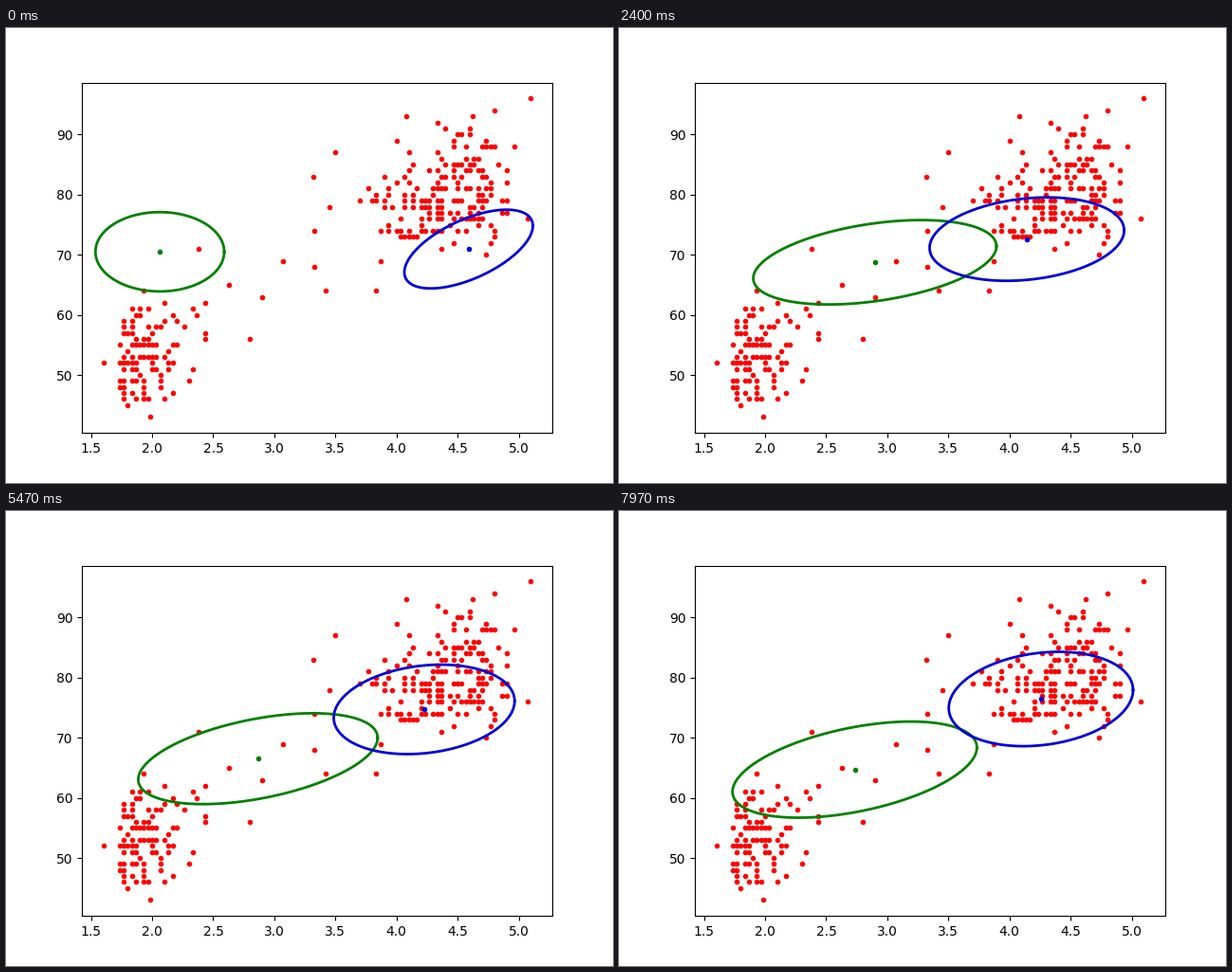
A matplotlib script for the animation above (8 s loop, 640 by 480 pixels).

```python
import random

import matplotlib.pyplot as plt
import numpy as np
from matplotlib.animation import FuncAnimation

FRAMES, LOOP_MS = 240, 8000
GREEN, BLUE = "green", "#0000d8"
ANGLE = np.linspace(0, 2 * np.pi, 181)
KEY_STEPS = np.array([0, 37, 72, 131, 239])

# Points lying apart from both clusters.
OUTLIERS = [
    (5.1, 96), (4.8, 94), (4.08, 93), (4.62, 93), (5.07, 76),
    (3.5, 87), (3.32, 83), (3.45, 78), (3.33, 74), (3.33, 68),
    (3.42, 64), (3.83, 64), (3.07, 69), (2.9, 63), (2.8, 56),
    (2.63, 65), (2.38, 71), (1.6, 52), (1.98, 43),
]


def cluster(count, draw_x, x_range, draw_y, y_range):
    """Distinct points, x in thirtieths and y whole, kept inside the ranges."""
    points = set()
    while len(points) < count:
        x = round(draw_x() * 30) / 30
        y = round(draw_y(x))
        if x_range[0] <= x <= x_range[1] and y_range[0] <= y <= y_range[1]:
            points.add((x, y))
    return sorted(points)


def smooth(values):
    """Cubic Hermite curve through values at the key steps."""
    values = np.array(values)
    slopes = np.gradient(values, KEY_STEPS, edge_order=2)

    def at(step):
        i = min(np.searchsorted(KEY_STEPS, step, side="right"),
                len(KEY_STEPS) - 1) - 1
        h = KEY_STEPS[i + 1] - KEY_STEPS[i]
        u = (step - KEY_STEPS[i]) / h
        blend = u * u * (3 - 2 * u)
        return (values[i] * (1 - blend) + values[i + 1] * blend
                + h * u * (1 - u) * ((1 - u) * slopes[i] - u * slopes[i + 1]))
    return at


class Ellipse:
    """Width, tilt and x ease between keys; y and height drift evenly."""

    def __init__(self, ax, color, x, width, tilt, y, height):
        self.x, self.width, self.tilt = smooth(x), smooth(width), smooth(tilt)
        self.y, self.height = y, height
        self.outline, = ax.plot([], [], color=color, lw=2)
        self.centre, = ax.plot([], [], ".", color=color)

    def move(self, step):
        part = step / (FRAMES - 1)
        x = self.x(step)
        y = np.interp(part, (0, 1), self.y)
        height = np.interp(part, (0, 1), self.height)
        phase = np.arccos(self.tilt(step))
        self.outline.set_data(x + self.width(step) * np.cos(ANGLE),
                              y + height * np.cos(ANGLE - phase))
        self.centre.set_data([x], [y])
        return self.outline, self.centre


rng = random.Random(11)
low = cluster(88, lambda: 1.7 + rng.gammavariate(2, 0.14), (1.7, 2.5),
              lambda x: 53.5 + 8 * (x - 1.96) + rng.gauss(0, 4.8), (45, 65))
high = cluster(155, lambda: 5 - rng.gammavariate(3.6, 0.17), (3.55, 5),
               lambda x: 79.8 + 6 * (x - 4.38) + rng.gauss(0, 4.8), (69, 92))

fig, ax = plt.subplots(figsize=(6.4, 4.8), dpi=100)
ax.plot(*zip(*OUTLIERS, *low, *high), "r.")
ax.set_xlim(1.425, 5.275)
ax.set_ylim(40.35, 98.65)

ellipses = [
    Ellipse(ax, GREEN, x=[2.063, 2.597, 2.898, 2.894, 2.733],
            width=[0.527, 1.025, 0.995, 0.98, 1.0],
            tilt=[0, 0.235, 0.38, 0.44, 0.46],
            y=(70.5, 64.7), height=(6.6, 8.0)),
    Ellipse(ax, BLUE, x=[4.59, 4.202, 4.142, 4.202, 4.257],
            width=[0.526, 0.91, 0.796, 0.751, 0.754],
            tilt=[0.59, 0.2, 0.21, 0.19, 0.19],
            y=(70.95, 76.45), height=(6.55, 7.85)),
]


def update(step):
    return [artist for e in ellipses for artist in e.move(step)]


anim = FuncAnimation(fig, update, frames=FRAMES, interval=LOOP_MS / FRAMES,
                     repeat=True, repeat_delay=0)
plt.show()
```
